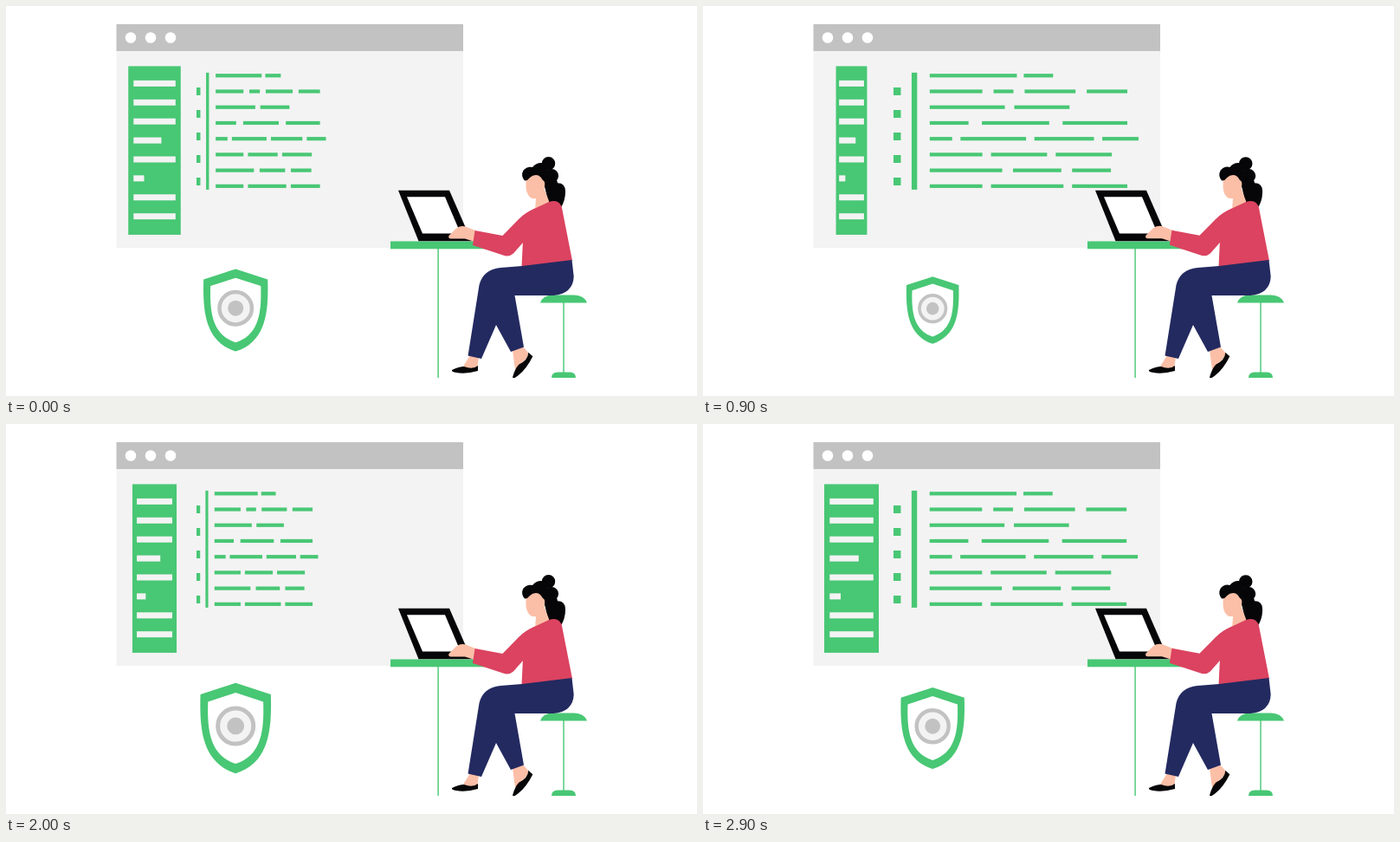
An HTML page that plays this animation: 798 by 450 pixels, repeating every 3 s.

```html
<!DOCTYPE html>
<html lang="en">
<head>
<meta charset="utf-8">
<title>Coding at a desk</title>
<style>
html, body { margin: 0; width: 100%; height: 100%; overflow: hidden; background: #fff; }
svg { display: block; width: 100vw; height: 100vh; }
.green { fill: #48c774; }
.skin { fill: #fbbfa7; }
.black { fill: #060608; }
.red { fill: #db4360; }
.navy { fill: #232a60; }
.grey { fill: #c2c2c2; }
.pale { fill: #f3f3f3; }
.white { fill: #fff; }
</style>
</head>
<body>
<svg viewBox="0 0 798 450" xmlns="http://www.w3.org/2000/svg">
  <defs>
    <path id="crest" d="M0 -47.5L37 -35.5C38 0 36 36 0 47.5C-36 36 -38 0 -37 -35.5Z"/>
    <path id="shoe" d="M0 0Q8 -4 14 -4Q24 0 30 -5V1Q16 5 5 3Q-1 2 0 0Z"/>
  </defs>

  <!-- browser window -->
  <rect class="pale" x="127.5" y="52" width="400.5" height="227"/>
  <rect class="grey" x="127.5" y="21" width="400.5" height="31"/>
  <g id="dots"></g>
  <g id="side"></g>
  <g id="code"></g>

  <g id="shield">
    <use href="#crest" class="green"/>
    <use href="#crest" class="white" transform="scale(.785)"/>
    <circle cy="-2.3" r="18.7" fill="#f3f3f3" stroke="#c2c2c2" stroke-width="4.5"/>
    <circle class="grey" cy="-2.3" r="9"/>
  </g>

  <!-- desk, stool and laptop -->
  <g class="green">
    <rect x="498.4" y="279" width="1.4" height="150"/>
    <rect x="444" y="271.5" width="110.5" height="8.8"/>
    <rect x="643.3" y="342" width="1.4" height="82"/>
    <path d="M617 342.5Q620 333.5 632 333.5H656Q668 334 671 342.5Z"/>
    <path d="M630 429Q630 422.5 637 422.5H651Q658 422.5 658 429Z"/>
  </g>
  <path class="black" d="M453 212.7H512L534 263L541 271.3H476.5Z"/>
  <path class="white" d="M463 220.3H507L525 262.5H481Z"/>

  <!-- woman -->
  <path class="skin" d="M536 403L546 405L544 419H526Z"/>
  <path class="skin" d="M585 397L597 393L605 402L594 414L588 420Z"/>
  <use href="#shoe" class="black" transform="translate(515 420)"/>
  <use href="#shoe" class="black" transform="translate(585 428.5) rotate(-48) scale(1.12)"/>
  <g id="head">
    <g class="black">
      <circle cx="626.5" cy="181.8" r="7.7"/>
      <circle cx="630" cy="196" r="8"/>
      <circle cx="629" cy="205" r="8"/>
      <path d="M622 208Q646 198 646 214Q646 225 640.500 233L627 230Z"/>
    </g>
    <path class="skin" d="M601 198Q599 212 603 218Q606 223 612 222L611 236H627V225L622 212L618 194L606 193Z"/>
    <path class="black" d="M599 201.500Q594 196 597.500 189.500Q602 184.500 608 186Q614 179 623 182L631 205L621 204Q618 195 612 195Q608 195 605 198Q602 202 599 201.500Z"/>
    <ellipse class="skin" cx="619" cy="205.500" rx="3.200" ry="4.500"/>
  </g>
  <path class="red" d="M595.500 301L597 270L596 243Q602 238 611 233.500L627 226Q639 222 642 233L654 294Z"/>
  <path class="navy" d="M596 300L571 302Q551 304 546.500 322L533.500 403.500L549 407L566 368L583 399L598 393.500L587.500 334H632Q655 332 655.700 312L653.500 293Z"/>
  <g id="arm">
    <path id="hand" class="skin" d="M542 259L532 255Q525 252.500 519.500 257L511.500 265Q510 269 516 268.500H530L541 272Z"/>
    <path class="red" d="M541.500 259L573.500 265L592 246Q600 238 611 233.500L618 248L597 273L586 285.500Q581 290 574 287.500L539 276Z"/>
  </g>
</svg>

<script>
const LOOP = 3000, STEP = 100;
const get = id => document.getElementById(id);
const [dots, side, code, shield, head, arm, hand] =
  ['dots', 'side', 'code', 'shield', 'head', 'arm', 'hand'].map(get);

function add(parent, tag, attrs) {
  const el = document.createElementNS('http://www.w3.org/2000/svg', tag);
  for (const k in attrs) el.setAttribute(k, attrs[k]);
  parent.appendChild(el);
}

function bar(parent, color, x, cy, width, height) {
  add(parent, 'rect', { class: color, x, y: cy - height / 2, width, height });
}

for (let i = 0; i < 3; i++)
  add(dots, 'circle', { class: 'white', cx: 144 + 23 * i, cy: 36.5, r: 6.3 });

// Sidebar, 63 wide around x = 0, with two short entries
const short = { 3: 33.5, 5: 12.7 };
bar(side, 'green', -31.5, 166.7, 63, 194.5);
for (let i = 0; i < 8; i++)
  bar(side, 'pale', -25.2, 89.4 + i * 21.9, short[i] || 50.5, 7);

// Code area, 284 wide from x = 0; words are spread evenly up to each row's end
function codeRow(cy, end, words) {
  let x = 42;
  const used = words.reduce((sum, w) => sum + w, 0);
  const gap = (end - x - used) / (words.length - 1);
  for (const w of words) {
    bar(code, 'green', x, cy, w, 4.2);
    x += w + gap;
  }
}
[
  [185, 101, 34],
  [271, 61, 23, 59, 47],
  [204, 87, 64],
  [271, 45, 78, 75],
  [284, 26, 76, 69, 42],
  [253, 61, 65, 65],
  [252, 84, 56, 45],
  [271, 61, 84, 64]
].forEach(([end, ...words], i) => codeRow(80.3 + i * 18.22, end, words));
for (let i = 0; i < 5; i++) bar(code, 'green', 0, 98.5 + i * 26, 8.5, 9);
bar(code, 'green', 21, 144.4, 6.4, 135);

function ease(x) {
  const a = x ** 1.75, b = (1 - x) ** 1.75;
  return a / (a + b);
}

// Eased value between [time, value] keys
function track(keys, t) {
  let i = 1;
  while (i < keys.length - 1 && t > keys[i][0]) i++;
  const [t0, v0] = keys[i - 1], [t1, v1] = keys[i];
  return v0 + (v1 - v0) * ease((t - t0) / (t1 - t0));
}

const sideKeys = [[-680, 29], [250, 66], [1180, 29], [2630, 65], [4250, 29]];
const codeKeys = [[-300, 124], [790, 288], [1690, 124], [3085, 288]];
const shieldKeys = [[0, 1], [500, 1.1], [1000, 0.8], [1500, 1]];

function draw(t) {
  const late = t + 20;
  const sway = ease(1 - Math.abs(1 - late % 1000 / 500));
  const pose = (el, value) => el.setAttribute('transform', value);
  pose(side, `translate(171.5 0) scale(${track(sideKeys, t) / 63} 1)`);
  pose(code, `translate(220 0) scale(${track(codeKeys, t) / 284} 1)`);
  pose(shield, `translate(265.2 351) scale(${track(shieldKeys, late % 1500)})`);
  pose(head, `rotate(${6.6 * sway} 618 232)`);
  pose(arm, `rotate(${4.1 * sway} 610 240)`);
  pose(hand, `rotate(${-3.5 * sway} 540 265)`);
}

const start = performance.now();
function tick() {
  const t = (performance.now() - start) % LOOP;
  draw(Math.floor(t / STEP) * STEP);
  requestAnimationFrame(tick);
}
draw(0);
requestAnimationFrame(tick);
</script>
</body>
</html>
```
